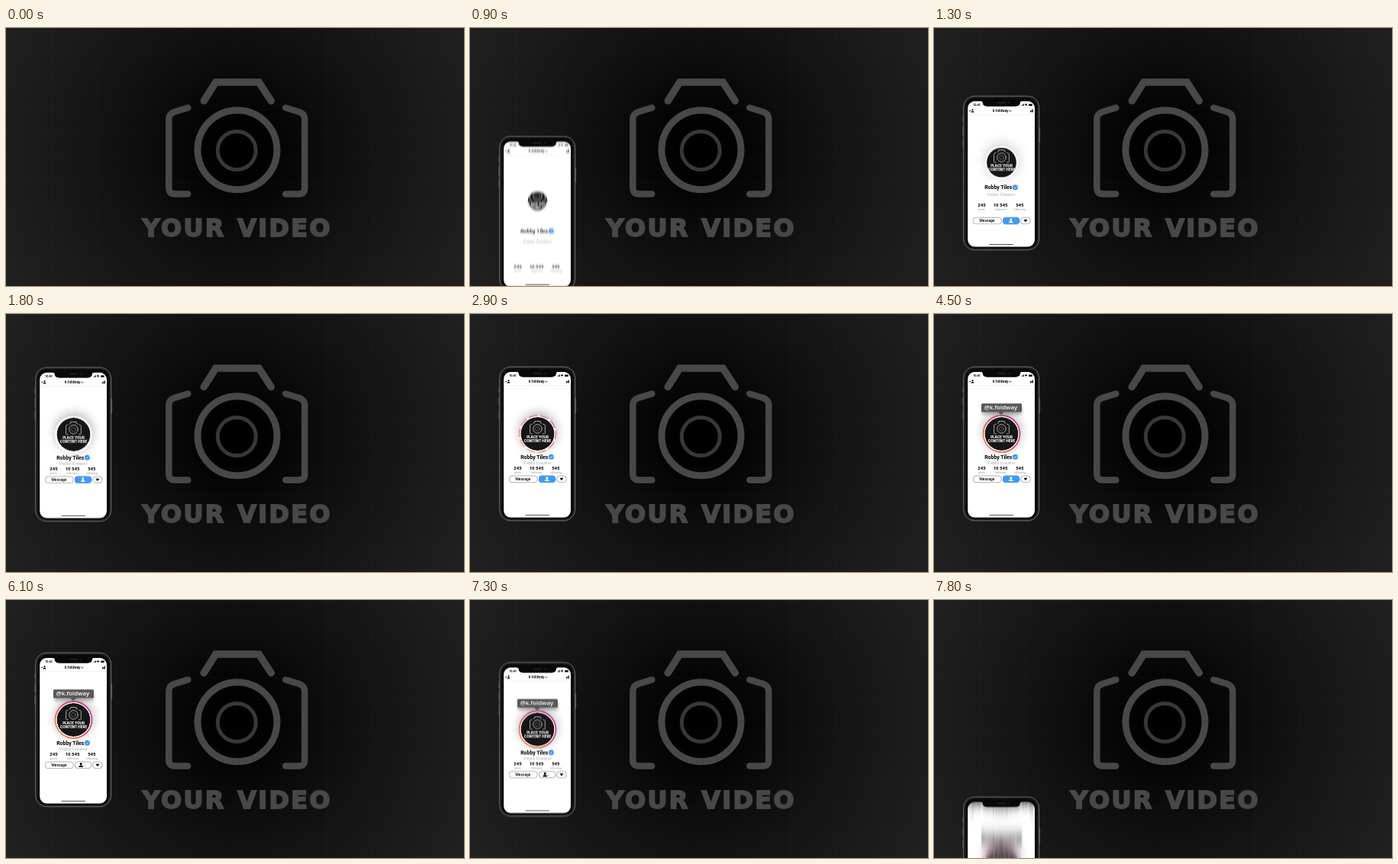
An HTML page without scripts that plays this animation: 600x338 px, repeating every 7.9 s.

```html
<!DOCTYPE html>
<html lang="en">
<head>
<meta charset="utf-8">
<title>Profile overlay</title>
<style>
html, body { margin: 0; width: 100%; height: 100%; overflow: hidden; background: #111; }
svg { display: block; width: 100%; height: 100%; }
text { font-family: Roboto, Inter, sans-serif; }
.mid { text-anchor: middle; }
.title { font: 700 32px "DejaVu Sans", sans-serif; letter-spacing: 2.3px; fill: #484848; stroke: #484848; stroke-width: 1.8px; }
.label { font-size: 3.7px; fill: #999; }
.count { font-size: 6px; font-weight: 700; }

/* Motion is held at ten poses per second: 1 pose = 1/79 of the loop */
.phone, .blur, .rise, .avatar, .halo, .ring, .tip, .press, .blue {
  animation: 7.9s steps(1) infinite;
}
.phone { animation-name: slide; }
.blur { animation-name: smear; }
.rise { animation-name: rise; }
.avatar { animation-name: grow; transform-origin: 88.5px 157px; }
.halo { animation-name: appear; }
.ring { animation-name: ring; transform-origin: 88.5px 157px; }
.tip { animation-name: pop; transform-origin: 88px 132px; }
.press { animation-name: press; transform-origin: 101px 216px; }
.blue { animation-name: fade; }

@keyframes slide {
  0% { transform: translateY(280px); }
  7.59% { transform: translateY(245px); }
  8.86% { transform: translateY(176px); }
  10.12% { transform: translateY(110px); }
  11.39% { transform: translateY(72.6px); }
  12.65% { transform: translateY(51px); }
  13.92% { transform: translateY(37px); }
  15.18% { transform: translateY(27px); }
  16.45% { transform: translateY(20px); animation-timing-function: steps(3); }
  20.25% { transform: translateY(5px); animation-timing-function: steps(2); }
  22.78% { transform: translateY(.8px); animation-timing-function: steps(3); }
  26.58%, 88.6% { transform: none; animation-timing-function: steps(2); }
  91.13% { transform: translateY(5px); animation-timing-function: steps(2); }
  93.67% { transform: translateY(20px); }
  94.93% { transform: translateY(37px); }
  96.2% { transform: translateY(66px); }
  97.46% { transform: translateY(110px); }
  98.73%, 100% { transform: translateY(188.6px); }
}
@keyframes smear {
  0% { filter: url(#fast); }
  10.12% { filter: url(#medium); }
  11.39% { filter: url(#slow); }
  13.92% { filter: none; }
  94.93% { filter: url(#slow); }
  96.2% { filter: url(#medium); }
  98.73%, 100% { filter: url(#fast); }
}
@keyframes rise {
  0%, 11.39% { transform: translateY(var(--d)); }
  12.65% { transform: translateY(calc(var(--d) * .7)); animation-timing-function: steps(3); }
  16.45% { transform: translateY(calc(var(--d) * .25)); animation-timing-function: steps(5); }
  22.78%, 100% { transform: none; }
}
@keyframes grow {
  0%, 11.39% { transform: scale(.58); animation-timing-function: steps(4); }
  16.45% { transform: scale(.88); animation-timing-function: steps(5); }
  22.78%, 100% { transform: none; }
}
@keyframes appear {
  0%, 11.39% { opacity: 0; animation-timing-function: steps(9); }
  22.78%, 100% { opacity: 1; }
}
@keyframes ring {
  0%, 27.84% { stroke-dasharray: 0 6; stroke-width: .5px; transform: rotate(-90deg); animation-timing-function: steps(7); }
  36.7% { stroke-dasharray: 4.6 1.4; stroke-width: 1.1px; transform: rotate(-10deg); animation-timing-function: steps(4); }
  41.77%, 100% { stroke-dasharray: 6 0; stroke-width: 1.7px; transform: none; }
}
@keyframes pop {
  0%, 45.56% { transform: scale(0); animation-timing-function: steps(4); }
  50.63% { transform: scale(1.06); animation-timing-function: steps(2); }
  53.16%, 100% { transform: none; }
}
@keyframes press {
  0%, 65.82% { transform: none; animation-timing-function: steps(2); }
  68.35% { transform: scale(.88); animation-timing-function: steps(2); }
  70.88%, 100% { transform: none; }
}
@keyframes fade {
  0%, 68.35% { opacity: 1; animation-timing-function: steps(2); }
  70.88%, 100% { opacity: 0; }
}
</style>
</head>
<body>
<svg viewBox="0 0 600 338" preserveAspectRatio="none">
  <defs>
    <radialGradient id="dusk" gradientUnits="userSpaceOnUse" cx="302" cy="160" r="340">
      <stop offset="0" stop-color="#000"/>
      <stop offset=".12" stop-color="#020202"/>
      <stop offset=".35" stop-color="#0d0d0d"/>
      <stop offset=".65" stop-color="#171717"/>
      <stop offset="1" stop-color="#202020"/>
    </radialGradient>
    <radialGradient id="glow">
      <stop offset=".5" stop-color="#777" stop-opacity=".45"/>
      <stop offset=".75" stop-color="#aaa" stop-opacity=".18"/>
      <stop offset="1" stop-color="#fff" stop-opacity="0"/>
    </radialGradient>
    <linearGradient id="story" x1="0" y1="1" x2="1" y2="0">
      <stop offset="0" stop-color="#f6a13a"/>
      <stop offset=".45" stop-color="#e9495f"/>
      <stop offset="1" stop-color="#b52fb0"/>
    </linearGradient>
    <pattern id="grid" width="60" height="33.8" patternUnits="userSpaceOnUse">
      <path d="M0 0H60M0 0V33.8" fill="none" stroke="#fff" stroke-opacity=".03"/>
    </pattern>
    <filter id="slow" filterUnits="userSpaceOnUse" x="30" y="40" width="120" height="260"><feGaussianBlur stdDeviation="0 1.4"/></filter>
    <filter id="medium" filterUnits="userSpaceOnUse" x="30" y="40" width="120" height="260"><feGaussianBlur stdDeviation="0 3.5"/></filter>
    <filter id="fast" filterUnits="userSpaceOnUse" x="30" y="40" width="120" height="260"><feGaussianBlur stdDeviation="0 8"/></filter>
    <filter id="soft" x="-20%" y="-50%" width="140%" height="220%"><feGaussianBlur stdDeviation="2"/></filter>
    <clipPath id="screen"><rect x="44.2" y="75.8" width="87.8" height="191" rx="9.5"/></clipPath>
    <clipPath id="lens"><circle class="avatar" cx="88.5" cy="157" r="22"/></clipPath>
    <g id="camera" fill="none" stroke-linecap="round">
      <path d="M259 95L274.5 70.5H331L347 95" stroke-width="9.5"/>
      <path d="M238 104L220 109.5Q213 112 213 119V209Q213 217 221 217H238M366 104L384 109.5Q391 112 391 119V209Q391 217 383 217H366" stroke-width="8.5"/>
      <circle cx="302.7" cy="159.2" r="52" stroke-width="9"/>
      <circle cx="302" cy="160" r="25" stroke-width="5" opacity=".78"/>
    </g>
    <g id="person">
      <circle r="1.5" cy="-1.6"/>
      <path d="M-2.8 2.8Q-2.8 .3 0 .3T2.8 2.8Z"/>
    </g>
    <path id="notch" d="M61.5 75.5Q64 76 64 78Q64 82.4 69.5 82.4H107Q112.6 82.4 112.6 78Q112.6 76 115 75.5V74H61.5Z" fill="#080808"/>
  </defs>

  <rect width="600" height="338" fill="url(#dusk)"/>
  <rect width="600" height="338" fill="url(#grid)"/>
  <use href="#camera" stroke="#484848" x=".3" y=".5"/>
  <text class="title"><tspan x="178.6" y="273.3">YOUR</tspan> <tspan x="303.2" y="273.3">VIDEO</tspan></text>

  <g class="phone">
    <path d="M38 96V103M38 109V121M38 125V137M138.5 110V130" stroke="#555" stroke-width="1.2"/>
    <rect x="38.7" y="69.2" width="99" height="201.6" rx="14.5" fill="#080808" stroke="#777"/>
    <rect x="40.4" y="70.9" width="95.6" height="198.2" rx="13" fill="none" stroke="#2d2d2d"/>

    <g clip-path="url(#screen)">
      <g class="blur">
        <rect x="43.5" y="75.8" width="89" height="191" fill="#fff"/>
        <use href="#notch"/>
        <text x="51" y="82.2" font-size="3.8" font-weight="700">10:45</text>
        <path d="M115 82V80.8M116.3 82V80M117.6 82V79.2" stroke="#000" stroke-width=".8"/>
        <path d="M118.9 80Q120.6 78.4 122.3 80L120.6 82Z"/>
        <rect x="124" y="79.4" width="4.8" height="2.6" rx=".7"/>

        <use href="#person" transform="translate(50.5 88.5) scale(.75)"/>
        <path d="M46.2 88.5H48M47.1 87.6V89.4" stroke="#000" stroke-width=".6"/>
        <text class="mid" x="87.3" y="90.4" style="font:700 4.3px Inter,sans-serif">k.foldway</text>
        <path d="M98.5 88L100 89.5L101.5 88" fill="none" stroke="#000" stroke-width=".8"/>
        <path d="M126.5 90.5V88.2M128 90.5V87.2M129.5 90.5V86.2M126 89H130" stroke="#000" stroke-width=".8"/>
        <path d="M43 93.8H133" stroke="#ddd" stroke-width=".5"/>

        <g class="rise" style="--d:-3px">
          <circle class="halo" cx="89" cy="154" r="39" fill="url(#glow)"/>
          <circle class="avatar" cx="88.5" cy="157" r="24.6" fill="#fff" fill-opacity=".85"/>
          <g clip-path="url(#lens)">
            <circle cx="88.5" cy="157" r="22" fill="#161616"/>
            <use href="#camera" stroke="#aaa" transform="translate(54.9 132.7) scale(.111)"/>
            <g class="mid" fill="#fff" style="font:800 4.5px Inter,sans-serif">
              <text x="88.5" y="163.4" style="font:inherit">PLACE YOUR</text>
              <text x="88.5" y="168.4" style="font:inherit">CONTENT HERE</text>
            </g>
          </g>
          <circle class="ring" cx="88.5" cy="157" r="24" pathLength="60" fill="none" stroke="url(#story)"/>
        </g>

        <g class="rise" style="--d:6px">
          <text class="mid" x="84.3" y="189.6" font-size="6.9" font-weight="700">Robby Tiles</text>
          <circle cx="106.4" cy="187.2" r="3.5" fill="#3b93ef"/>
          <path d="M104.8 187.3L106 188.5L108.2 186" fill="none" stroke="#fff" stroke-width=".8"/>
        </g>
        <text class="mid rise" style="--d:12px" x="88.2" y="197" font-size="5.8" letter-spacing=".15" fill="#aaa">Video Creator</text>

        <g class="mid rise" style="--d:38px">
          <text class="count" x="62.5" y="204.3">245</text>
          <text class="count" x="87" y="204.3">10 545</text>
          <text class="count" x="112.3" y="204.3">545</text>
          <text class="label" x="62.5" y="209">posts</text>
          <text class="label" x="87.5" y="209">followers</text>
          <text class="label" x="112.5" y="209">following</text>
        </g>

        <g class="rise" style="--d:65px">
          <g fill="#fff" stroke="#777" stroke-width=".6">
            <rect x="51.3" y="212" width="37" height="8.6" rx="3.6"/>
            <rect x="113.7" y="212" width="12.4" height="8.6" rx="3.6"/>
          </g>
          <text class="mid" x="69.5" y="218.1" font-size="4.9" font-weight="500">Message</text>
          <path d="M117.4 214.8H122.4L119.9 218.2Z"/>
          <g class="press">
            <rect x="90.3" y="212" width="21.6" height="8.6" rx="3.6" fill="#fff" stroke="#777" stroke-width=".6"/>
            <use href="#person" x="98.2" y="216.3"/>
            <path d="M101.6 217L102.5 217.9L104 216.2" fill="none" stroke="#555" stroke-width=".5"/>
            <g class="blue">
              <rect x="90" y="211.7" width="22.2" height="9.2" rx="3.8" fill="#4099f5"/>
              <use href="#person" x="100.8" y="216.3" fill="#fff"/>
            </g>
          </g>
        </g>

        <g class="tip">
          <rect x="63" y="120" width="52" height="12" fill="#000" opacity=".3" filter="url(#soft)"/>
          <path d="M63.5 117.2H113.5Q115 117.2 115 118.7V127Q115 128.5 113.5 128.5H92L88 132.3L84 128.5H63.5Q62 128.5 62 127V118.7Q62 117.2 63.5 117.2Z" fill="#595959"/>
          <text class="mid" x="87.5" y="125.4" style="font:600 7.8px 'Open Sans',sans-serif" fill="#fff">@k.foldway</text>
        </g>
      </g>
      <path d="M73 263.5H103.5" stroke="#555" stroke-width="1.2" stroke-linecap="round"/>
    </g>
    <use href="#notch"/>
    <path d="M83 77.8H93" stroke="#333" stroke-linecap="round"/>
    <circle cx="98" cy="77.8" r="1" fill="#26262e"/>
  </g>
</svg>
</body>
</html>
```
